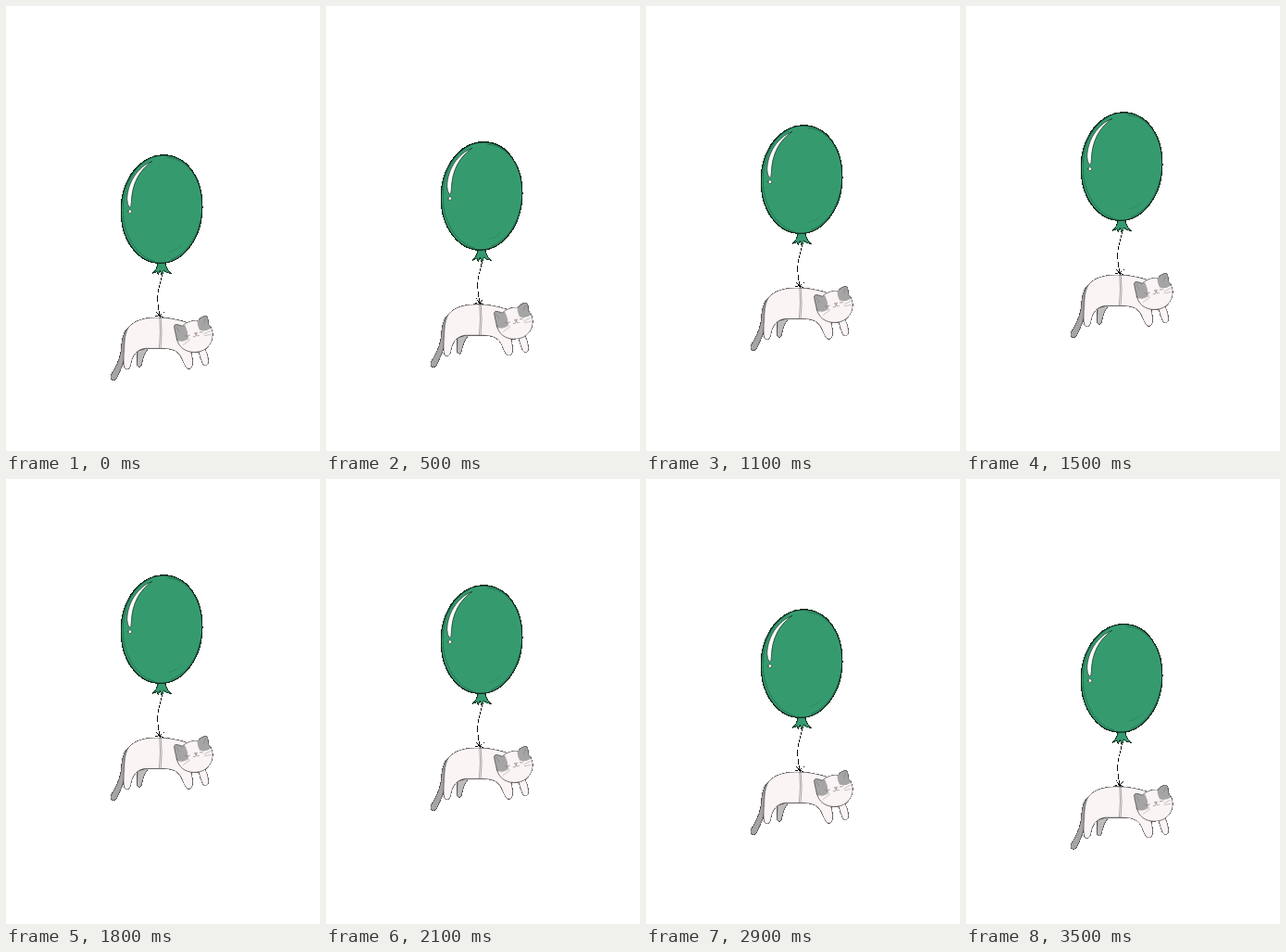
An HTML page with a canvas that plays this animation: 339x480 px, repeating every 3.6 s.

```html
<!DOCTYPE html>
<html lang="en">
<head>
<meta charset="utf-8">
<title>Balloon cat</title>
<style>
html, body { margin: 0; width: 100%; height: 100%; overflow: hidden; background: #fff; }
canvas { display: block; width: 339px; height: 480px; }
</style>
</head>
<body>
<canvas id="stage" width="339" height="480"></canvas>
<script>
const W = 339, H = 480, LOOP = 3600, STEP = 100;
const ctx = document.getElementById('stage').getContext('2d', { willReadFrequently: true });
const GREEN = '#359b6f', RIM = '#12271d', FUR = '#faf4f4', GREY = '#a6a5a5', INK = '#3f3d3d';

// Height of the float at key times: [ms, px]
const LIFT = [[0, 0], [600, 17], [1200, 35], [1800, 57], [2400, 35], [3000, 17], [3500, 4.2]];

function liftAt(t) {
  for (let i = 1; i < LIFT.length; i++) {
    const [t0, y0] = LIFT[i - 1], [t1, y1] = LIFT[i];
    if (t <= t1) return y0 + (y1 - y0) * (t - t0) / (t1 - t0);
  }
  return LIFT[LIFT.length - 1][1];
}

function shape(d, fill, line, width = 0.8) {
  const p = new Path2D(d);
  if (fill) { ctx.fillStyle = fill; ctx.fill(p); }
  if (line) { ctx.strokeStyle = line; ctx.lineWidth = width; ctx.stroke(p); }
}

function drawBalloon() {
  shape('M164 275 Q163.5 283 157.5 288.3 L162.6 286 L163.8 289.3 L166 284.8 L168 290.8 L170 284.8 L173 287 L178 288.3 Q172 283 171 275Z', GREEN, RIM, 0.9);
  shape('M170 160.5 C195 160.5 212 186 211.5 216 C211.2 250 191 277 166.5 277 C142 277 123.3 252 123.8 219 C124.3 186 145 160.5 170 160.5Z', GREEN, RIM, 1.3);
  // Darker inner rim
  shape('M154 165 C136 174 126 195 125.8 220 C126 247 141 270 160 275 M174 163 C186 164 194 170 199 177 M209 231 C206 251 193 267 178 273', null, '#22704f', 0.9);
  shape('M176 265 Q184 263 188 258', null, '#2c8760', 0.8);
  shape('M157 167.3 C142 173 130.7 190 130.3 208 Q130.5 214 133 217 Q135 216 135 211 C135.5 192 143 177 157 167.3Z', '#fff', RIM, 0.7);
  shape('M131.5 221.3 a1.9 1.9 0 1 0 3.8 0 a1.9 1.9 0 1 0 -3.8 0Z', '#fff', RIM, 0.6);
}

function drawString() {
  shape('M168 290 C166 300 163 307 163.3 316 Q163.5 325 165.3 332', null, '#111', 0.82);
}

function drawBody() {
  // Tail and far hind leg
  shape('M132 346 C125 351 124.5 363 123.7 372 C122 382 117 391 112.8 398 Q111.5 402 115 403.4 Q118 403.5 119.5 400.5 C123 392 127 386 127.5 376Z', GREY, INK, 0.7);
  shape('M141.5 372 L141 386 Q141 389.5 144 389 Q146 388.5 146.5 384 Q148 375 154 368Z', '#bdbbbb', INK, 0.7);
  // Near foreleg on the right
  shape('M207 370 Q209 379 211.7 385 Q213 388.3 216 387.6 Q218.6 386.5 218.3 382 Q217.8 375 214 368Z', FUR, INK, 0.7);
  shape('M166 335.6 C150 335 139 338 132 346 C126 354 127 368 126.6 382 Q126.3 391.5 130 391.5 Q133.5 391.5 134.5 386 C136 376 141 370 150 369 L166 369 C179 369 185 371 189 379 Q191.5 386 194 389.5 Q196 391.8 199.3 390.5 Q201.8 388 201.2 382 Q200.5 376 199 371 L207 345 Q191 339 180 337 Q172 335.6 166 335.6Z', FUR, INK, 0.7);
  shape('M130.8 348 C127.2 355 127.5 364 127.2 373', null, '#858383', 0.9);
  // String looped around the belly
  shape('M165.4 336 Q167 351 165 368.5 M166.9 336 Q168.6 352 166.7 368.5', null, '#6a6767', 0.55);
  shape('M161.3 328.6 L165.4 334 L170.4 329.5 M164.8 333.5 L160.8 334.3 M165.5 333.5 L169.6 335.5 M164.6 329.5 L165.8 335', null, '#111', 0.8);
}

function drawHead() {
  const head = 'M184 359 C183 354 181.2 348 181.2 344.5 Q182 342.3 185.5 343.4 L190 344.8 C195 340 201 338.3 207 338.8 Q210 334.5 214.5 333.8 Q217.7 333.8 217.8 338 L218.5 343 C223.5 348 223.8 356 221.3 362 C217.5 370 210 373.2 202 373 C193 372.7 186 367.5 184 359Z';
  shape(head, FUR);
  ctx.save();
  ctx.clip(new Path2D(head));
  shape('M179 340 L193 344 Q196.5 351 196.3 358 Q191 362 183.5 361Z', GREY);
  shape('M206 339 L213 331 L220 333 L221 347 Q215 351 208.6 349 Q206 344 206 339Z', GREY);
  ctx.restore();
  shape(head, null, INK, 0.7);
  shape('M183.5 346 L186.5 351 M215 336.5 L213 342', null, '#8c8989', 0.8);
  // Closed eyes, nose and mouth
  shape('M193 355.3 Q195.5 357.4 198 354.7 M209 351.5 Q211.5 352.6 213 350', null, '#777', 0.7);
  shape('M203 352.3 L206.2 351.8 L205 354Z', '#d9a7a5', '#888', 0.5);
  shape('M205 354 Q204.8 357 201.8 356.5 M205 354 Q206 356.7 208 355.2', null, '#777', 0.6);
  shape('M197.5 358.5 L189 361.5 M198 360 L191 365 M213.5 353.5 L220.5 350 M214 355.3 L221 354', null, '#aaa7a7', 0.6);
}

// Cut-out edges: every pixel is either solid or clear
function hardenEdges() {
  const img = ctx.getImageData(0, 0, W, H), px = img.data;
  for (let i = 3; i < px.length; i += 4) px[i] = px[i] < 128 ? 0 : 255;
  ctx.putImageData(img, 0, 0);
}

function draw(t) {
  ctx.clearRect(0, 0, W, H);
  ctx.save();
  ctx.lineJoin = ctx.lineCap = 'round';
  ctx.translate(0.4, 0.4 - liftAt(t));
  drawBalloon();
  drawString();
  drawBody();
  drawHead();
  ctx.restore();
  hardenEdges();
}

const start = performance.now();
let shown = -1;
function tick() {
  const t = Math.floor((performance.now() - start) % LOOP / STEP) * STEP;
  if (t !== shown) draw(shown = t);
  requestAnimationFrame(tick);
}
tick();
</script>
</body>
</html>
```
